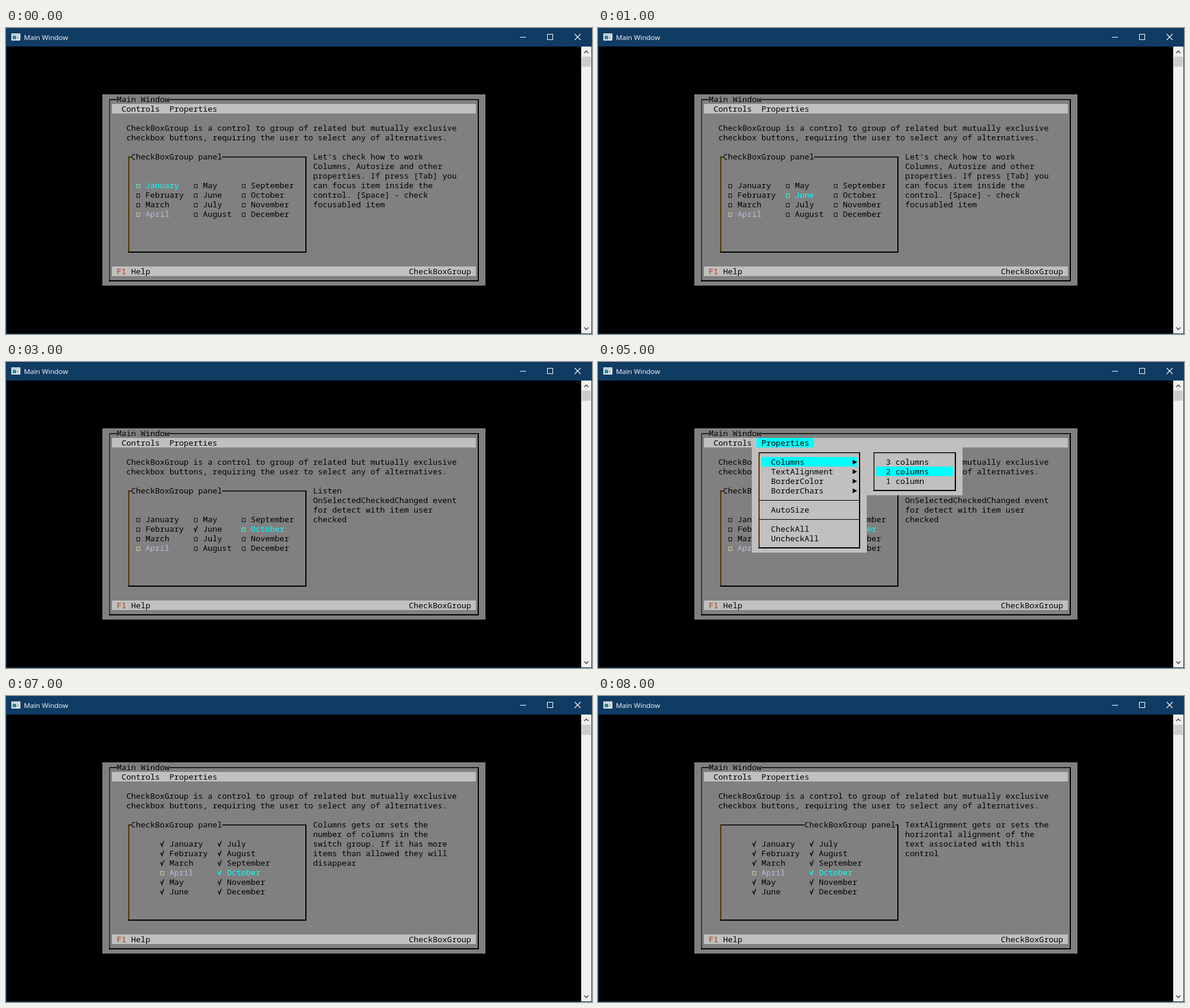
These frames come from a looping animation (979x512 px, 9 s). An HTML page with a canvas:

```html
<!DOCTYPE html>
<html lang="en">
<head>
<meta charset="utf-8">
<title>Main Window</title>
<style>
html, body { margin: 0; width: 100%; height: 100%; overflow: hidden; background: #000; }
canvas { display: block; width: 979px; height: 512px; }
</style>
</head>
<body>
<canvas id="stage" width="979" height="512"></canvas>
<script>
const ctx = document.getElementById('stage').getContext('2d', { alpha: false });
const LOOP = 9000;
const MONO = '13.3333px "Noto Sans Mono", "DejaVu Sans Mono", monospace';
const GRAY = '#808080', SILVER = '#c0c0c0', CYAN = '#00ffff', TITLE = '#103b63';
const MONTHS = ['January', 'February', 'March', 'April', 'May', 'June', 'July',
  'August', 'September', 'October', 'November', 'December'];

const INTRO = ["Let's check how to work", 'Columns, Autosize and other', 'properties. If press [Tab] you',
  'can focus item inside the', 'control. [Space] - check', 'focusabled item'];
const EVENT = ['Listen', 'OnSelectedCheckedChanged event', 'for detect with item user', 'checked'];
const COLUMNS = ['Columns gets or sets the', 'number of columns in the', 'switch group. If it has more',
  'items than allowed they will', 'disappear'];
const ALIGN = ['TextAlignment gets or sets the', 'horizontal alignment of the', 'text associated with this', 'control'];

const DISABLED = 3;
const WIDE = { cols: [27, 39, 49], row: 14, perCol: 4 };
const NARROW = { cols: [32, 44], row: 13, perCol: 6 };
const ALL = MONTHS.map((_, i) => i).filter(i => i !== DISABLED);

const SCENES = [
  { at: 0, layout: WIDE, focus: 0, checked: [], info: INTRO },
  { at: 1000, layout: WIDE, focus: 5, checked: [], info: INTRO },
  { at: 2000, layout: WIDE, focus: 5, checked: [], info: INTRO, popup: drawDialog },
  { at: 3000, layout: WIDE, focus: 9, checked: [5], info: EVENT },
  { at: 5000, layout: WIDE, focus: 9, checked: [5], info: EVENT, popup: drawMenu },
  { at: 6000, layout: NARROW, focus: 9, checked: [5, 9], info: COLUMNS },
  { at: 7000, layout: NARROW, focus: 9, checked: ALL, info: COLUMNS },
  { at: 8000, layout: NARROW, focus: 9, checked: ALL, info: ALIGN, titleRight: true }
];

// Console cells are 8 by 16 pixels.
const cellX = col => 1 + col * 8;
const cellY = row => 31 + row * 16;

function rect(x, y, w, h, color) {
  ctx.fillStyle = color;
  ctx.fillRect(x, y, w, h);
}

function cells(col, row, w, h, color) {
  rect(cellX(col), cellY(row), w * 8, h * 16, color);
}

function text(col, row, str, color = '#000') {
  ctx.font = MONO;
  ctx.fillStyle = color;
  [...str].forEach((ch, i) => ctx.fillText(ch, cellX(col + i), cellY(row) + 13));
}

function lines(col, row, list) {
  list.forEach((str, i) => text(col, row + i, str));
}

function path(points, color, width = 1) {
  ctx.strokeStyle = color;
  ctx.lineWidth = width;
  ctx.beginPath();
  points.forEach(([x, y]) => ctx.lineTo(x, y));
  ctx.stroke();
}

// Frame lines run through the middle of their cells.
function frame(col, row, w, h, bg) {
  const x = cellX(col) + 4, y = cellY(row) + 8;
  const right = x + (w - 1) * 8, bottom = y + (h - 1) * 16;
  rect(x - 1, y, 1, bottom - y, '#704810');
  rect(x, y, 1, bottom - y, bg === GRAY ? '#382208' : '#402810');
  rect(right - 1, y, 1, bottom - y, '#200008');
  rect(right, y, 1, bottom - y + 1, '#000');
  rect(x, y, right - x + 1, 1.5, '#000');
  rect(x - 1, bottom - 1, right - x + 2, 2, '#000');
}

function frameTitle(col, row, str) {
  cells(col, row, str.length, 1, GRAY);
  text(col, row, str);
}

function drawChrome() {
  rect(0, 0, 979, 512, TITLE);
  rect(1, 31, 960, 480, '#000');

  rect(9, 9, 15, 12, '#e8edf0');
  rect(10, 10, 13, 2, '#b8c4cc');
  rect(11, 13, 6, 6, '#2f8790');
  rect(18, 13, 4, 6, '#b8c4c8');

  ctx.font = '11.6px "Open Sans", "Noto Sans", sans-serif';
  ctx.fillStyle = '#fff';
  ctx.fillText('Main Window', 30, 20);

  rect(859, 15, 10, 1, '#fff');
  ctx.strokeStyle = '#fff';
  ctx.lineWidth = 1;
  ctx.strokeRect(904.5, 10.5, 9, 9);
  path([[950, 10], [960, 20]], '#fff', 1.1);
  path([[960, 10], [950, 20]], '#fff', 1.1);

  rect(961, 31, 17, 480, '#f0f0f0');
  rect(962, 48, 15, 17, '#cdcdcd');
  path([[966, 42], [969.5, 38.5], [973, 42]], '#505050', 1.6);
  path([[966, 501], [969.5, 504.5], [973, 501]], '#505050', 1.6);
}

function drawForm(scene) {
  cells(20, 5, 80, 20, GRAY);
  frame(21, 5, 78, 20, GRAY);
  frameTitle(23, 5, 'Main Window');
  cells(22, 6, 76, 1, SILVER);
  text(24, 6, 'Controls');
  text(34, 6, 'Properties');
  lines(25, 8, ['CheckBoxGroup is a control to group of related but mutually exclusive',
    'checkbox buttons, requiring the user to select any of alternatives.']);

  frame(25, 11, 38, 11, GRAY);
  frameTitle(scene.titleRight ? 43 : 26, 11, 'CheckBoxGroup panel');
  lines(64, 11, scene.info);

  cells(22, 23, 76, 1, SILVER);
  text(23, 23, 'F1', '#aa380c');
  text(26, 23, 'Help');
  text(84, 23, 'CheckBoxGroup');
}

function drawItem(i, { layout, focus, checked }) {
  const col = layout.cols[Math.floor(i / layout.perCol)];
  const row = layout.row + i % layout.perCol;
  const x = cellX(col), y = cellY(row);
  let label = '#000', mark = '#08181c';
  if (i === DISABLED) [label, mark] = ['#b9bdd6', '#d0cca8'];
  if (i === focus) [label, mark] = [CYAN, '#48ffc0'];

  if (checked.includes(i)) {
    path([[x + 0.8, y + 8.5], [x + 2, y + 7.8], [x + 3.5, y + 12.5], [x + 6.8, y + 3.5]],
      i === focus ? CYAN : '#000', 1.3);
  } else {
    ctx.strokeStyle = mark;
    ctx.lineWidth = 1;
    ctx.strokeRect(x + 1.5, y + 6.5, 5, 6);
  }
  text(col + 2, row, MONTHS[i], label);
}

function drawDialog() {
  cells(48, 12, 24, 6, SILVER);
  frame(49, 12, 22, 6, SILVER);
  text(52, 14, 'June was checked');
  cells(58, 16, 10, 1, CYAN);
  text(62, 16, 'OK');
}

function drawMenu() {
  cells(33, 6, 12, 1, CYAN);
  text(34, 6, 'Properties');

  cells(32, 7, 24, 11, SILVER);
  frame(33, 7, 22, 11, SILVER);
  cells(34, 8, 20, 1, CYAN);
  lines(36, 8, ['Columns', 'TextAlignment', 'BorderColor', 'BorderChars', '', 'AutoSize', '', 'CheckAll', 'UncheckAll']);
  for (const row of [12, 14]) rect(269, cellY(row) + 8, 168, 1, '#000');
  for (let row = 8; row < 12; row++) {
    const y = cellY(row) + 8;
    ctx.fillStyle = '#000';
    ctx.beginPath();
    ctx.moveTo(425.5, y - 3.5);
    ctx.lineTo(433, y + 0.5);
    ctx.lineTo(425.5, y + 4.5);
    ctx.fill();
  }

  cells(56, 7, 20, 5, SILVER);
  frame(57, 7, 18, 5, SILVER);
  cells(58, 9, 16, 1, CYAN);
  lines(60, 8, ['3 columns', '2 columns', '1 column']);
}

function draw(time) {
  const scene = SCENES.findLast(s => s.at <= time);
  drawChrome();
  drawForm(scene);
  MONTHS.forEach((_, i) => drawItem(i, scene));
  if (scene.popup) scene.popup();
}

const start = performance.now();
function tick() {
  draw((performance.now() - start) % LOOP);
  requestAnimationFrame(tick);
}
tick();
</script>
</body>
</html>
```
